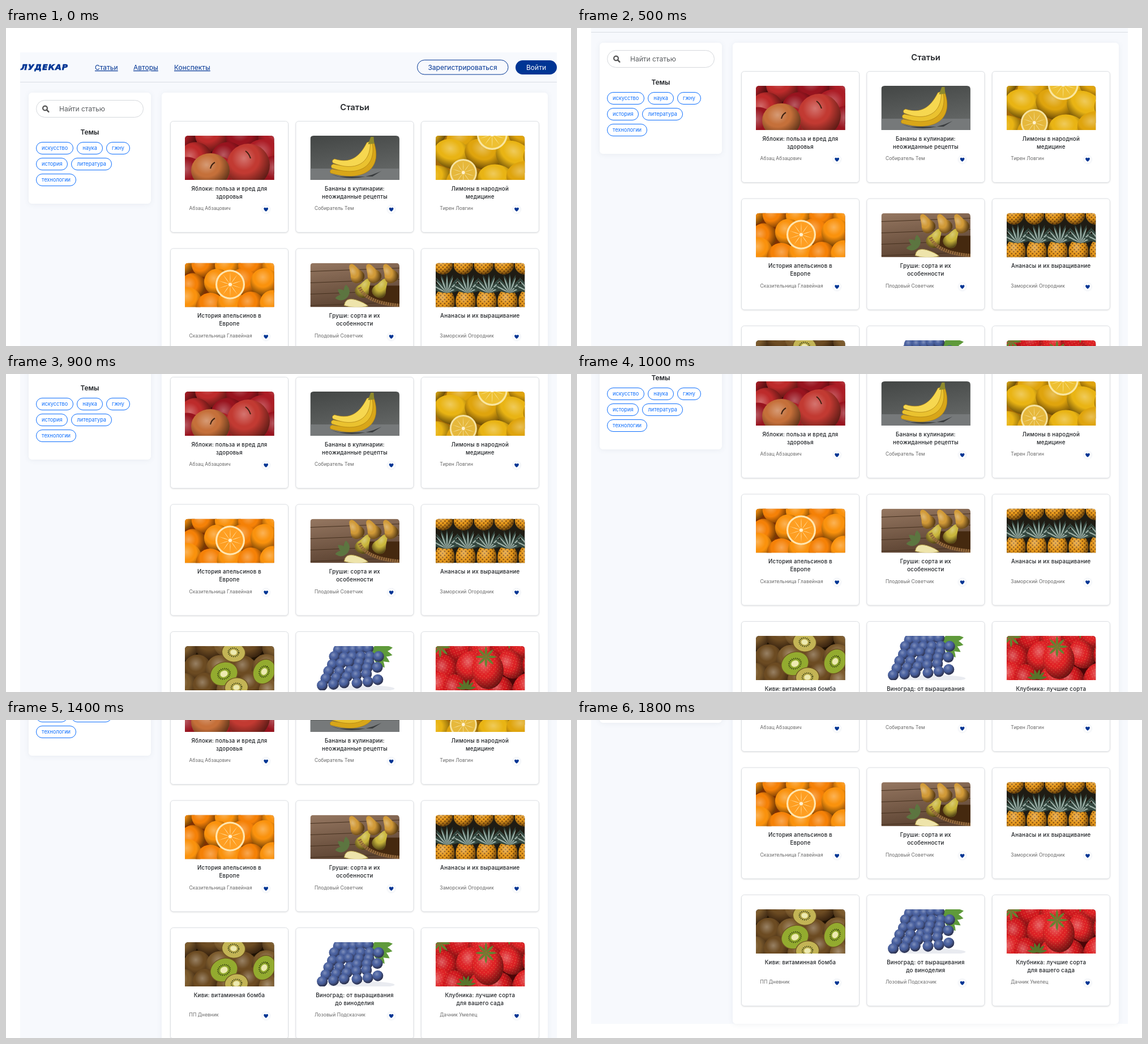
These frames come from a looping animation (998 by 561 pixels, 5000 ms). An HTML page:

```html
<!DOCTYPE html>
<html lang="ru">
<head>
<meta charset="utf-8">
<title>Статьи</title>
<style>
html, body { margin: 0; width: 100%; height: 100%; overflow: hidden; background: #fff; }
svg { display: block; width: 998px; height: 561px; font: 12px Inter, "Noto Sans", sans-serif; }
.mid { text-anchor: middle; }
.panel { fill: #fff; filter: drop-shadow(0 1px 4px rgba(30, 50, 90, .07)); }
.card { fill: #fff; stroke: #dcdfe3; filter: drop-shadow(0 1px 1px rgba(0, 0, 0, .1)); }
.nav { fill: #003594; text-decoration: underline; }
.logo { font: italic bold 14px "DejaVu Sans", sans-serif; letter-spacing: 1px; fill: #003594; stroke: #003594; stroke-width: .7; }
.head { font-weight: 600; fill: #24272b; }
.big { font-size: 14.7px; }
.title { font-size: 9.7px; font-weight: 500; letter-spacing: .26px; fill: #1d2024; }
.author { font-size: 8.5px; letter-spacing: .08px; fill: #666; }
.tags { display: flex; flex-wrap: wrap; gap: 6px; }
.tags span { padding: 0 9px; border: 1px solid #0d6efd; border-radius: 11px; font-size: 9.2px; line-height: 20px; color: #0d6efd; }
.dot { fill: #fff; filter: drop-shadow(0 0 1.5px rgba(40, 70, 130, .18)); }
</style>
</head>
<body>
<svg viewBox="0 0 998 561">
  <defs>
    <radialGradient id="shade" cx=".4" cy=".34" r=".7">
      <stop stop-color="#fff" stop-opacity=".3"/>
      <stop offset=".4" stop-color="#fff" stop-opacity="0"/>
      <stop offset=".5" stop-color="#100400" stop-opacity="0"/>
      <stop offset="1" stop-color="#100400" stop-opacity=".62"/>
    </radialGradient>
    <linearGradient id="wall" x2=".3" y2="1"><stop stop-color="#434645"/><stop offset="1" stop-color="#646766"/></linearGradient>
    <linearGradient id="wood" x2=".3" y2="1"><stop stop-color="#957761"/><stop offset="1" stop-color="#5d4433"/></linearGradient>
    <pattern id="scales" width="5" height="5" patternUnits="userSpaceOnUse" patternTransform="rotate(45)"><circle cx="2.5" cy="2.5" r="1.2" fill="#6d3d0c"/></pattern>
    <pattern id="seeds" width="5" height="5" patternUnits="userSpaceOnUse" patternTransform="rotate(45)"><circle cx="2.5" cy="2.5" r=".6" fill="#f3a564"/></pattern>
    <clipPath id="photo"><path d="M0 78V6Q0 0 6 0H151.5Q157.5 0 157.5 6V78Z"/></clipPath>
  </defs>
  <g id="page"></g>
</svg>
<script>
const times = (n, make) => Array.from({ length: n }, (_, i) => make(i)).join('');
const noise = n => { const v = Math.sin(n * 127.1 + 11.7) * 43758.5; return v - Math.floor(v); };

const rect = (x, y, w, h, attrs) => `<rect x="${x}" y="${y}" width="${w}" height="${h}" ${attrs}/>`;
const path = (d, attrs) => `<path d="${d}" ${attrs}/>`;
const text = (cls, x, y, words, attrs = '') => `<text class="${cls}" x="${x}" y="${y}" ${attrs}>${words}</text>`;
const backdrop = color => rect(0, 0, 158, 78, `fill="${color}"`);

// Flat colour, then optional dots, then light and shadow
const shaded = (shape, color, dots) => [color, dots, 'url(#shade)'].filter(Boolean)
  .map(fill => `<${shape} fill="${fill}"/>`).join('');
const ball = (color, x, y, rx, ry = rx, turn = 0, dots = '') =>
  shaded(`ellipse rx="${rx}" ry="${ry}" transform="translate(${x} ${y}) rotate(${turn})"`, color, dots);
const pear = (color, x, y, turn) =>
  shaded(`path d="M0-18C6-18 6-7 10 0C16 10 10 18 0 18C-10 18-16 10-10 0C-6-7-6-18 0-18Z" transform="translate(${x} ${y}) rotate(${turn})"`, color);

// Three staggered rows of fruit that fill the photo; flat < 1 makes ovals
function heap(colors, cols, seed, flat = 1, dots = '') {
  const w = 158 / cols;
  return times(3 * (cols + 1), i => {
    const row = Math.floor(i / (cols + 1)), col = i % (cols + 1), n = noise(seed + i);
    const x = (col + row % 2 / 2 + (n - .5) * .3) * w;
    const y = 2 + row * 36 + (noise(seed - i) - .5) * 12;
    const r = w * (.56 + n * .1);
    return ball(colors[i % colors.length], x, y, r, r * flat, n * 70 - 35, dots);
  });
}

// n pointed leaves spread over an arc around (x, y)
const leaves = (x, y, n, length, width, color, from = 0, arc = 360) => times(n, i =>
  path(`M0 0Q${width} ${-length / 2} 0 ${-length}Q${-width} ${-length / 2} 0 0`,
    `fill="${color}" transform="translate(${x} ${y}) rotate(${from + arc * i / n})"`));

const disc = (x, y, r, color) => `<circle cx="${x}" cy="${y}" r="${r}" fill="${color}"/>`;
const citrus = (x, y, r, rim, flesh) => disc(x, y, r, rim) + disc(x, y, r * .88, flesh) +
  leaves(x, y, 10, r * .84, .9, rim) + disc(x, y, r * .12, '#fff1cf');

const kiwiSlice = (x, y, r, turn, color) =>
  `<g transform="translate(${x} ${y}) rotate(${turn}) scale(1 .82)">` +
  disc(0, 0, r + 1.5, '#6f5423') + disc(0, 0, r, color) +
  `<circle r="${r * .45}" fill="none" stroke="#29310c" stroke-width="3" stroke-dasharray="1.2 2"/>` +
  disc(0, 0, r * .28, '#edeab0') + '</g>';

const banana = (color, i) => path(
  `M${112 - 3 * i} 10C${130 - 11 * i} ${62 - 6 * i} ${90 - 6 * i} ${82 - 9 * i} ${36 + 2 * i} ${66 - 9 * i}` +
  `q-3-5 3-7C${80 - 4 * i} ${68 - 9 * i} ${100 - 6 * i} ${46 - 5 * i} ${106 - 3 * i} 12Z`,
  `fill="${color}" stroke="#a87c12" stroke-width=".7"`);

const photos = {
  apples: () => backdrop('#3d070b') + heap(['#ac1d26', '#bd2b2b', '#98141f'], 3, 4) +
    ball('#c23a32', 112, 52, 38) + ball('#c5703a', 45, 61, 34, 30) +
    path('M45 58q2-8 8-11M116 40q-3-9-9-13', 'stroke="#3c2010" stroke-width="2" fill="none"'),

  bananas: () => backdrop('url(#wall)') + rect(0, 58, 158, 20, 'fill="#76797a"') +
    path('M36 68Q80 84 126 62L110 72H52Z', 'fill="#3a3d3f"') +
    ['#d8a619', '#eac22f', '#f6d750'].map(banana).join('') +
    path('M102 15L107 2H112L113 14Z', 'fill="#8f8a2c"'),

  lemons: () => backdrop('#a46a05') + heap(['#e9b414', '#dfa40d'], 3, 8, .78) +
    citrus(100, -2, 27, '#f9e6a0', '#eec032') + citrus(49, 65, 24, '#f6e3a2', '#e6b83c'),

  oranges: () => backdrop('#7c3203') + heap(['#fa920d', '#f58107'], 4, 3) +
    citrus(80, 38, 26, '#ffe6b0', '#ff9f22'),

  pears: () => backdrop('url(#wood)') +
    times(4, i => path(`M0 ${15 + i * 20}L158 ${9 + i * 20}`, 'stroke="#46311f" stroke-width="1.2"')) +
    path('M88 40Q95 72 158 76V40Z', 'fill="#45290f"') +
    times(5, i => pear(i % 2 ? '#c9b63c' : '#d19a38', 80 + i * 15, i % 2 ? 44 : 18, i % 2 ? 30 : -30)) +
    path('M87 43Q98 70 158 75', 'stroke="#93693c" stroke-width="6" stroke-dasharray="3 1" fill="none"') +
    leaves(66, 60, 3, 22, 10, '#5c7540', -95, 130) +
    path('M60 75Q62 60 80 65Q96 70 102 76Q80 81 60 75Z', 'fill="#eee4ab" stroke="#b9a448"'),

  pineapples: () => backdrop('#1f1c14') +
    times(5, i => ball('#e89a1c', 13 + 36 * i, 4, 17, 16, 0, 'url(#scales)')) +
    times(5, i => ball('#e89a1c', 16 + 37 * i, 68, 17.5, 23, 0, 'url(#scales)')) +
    times(5, i => leaves(20 + 37 * i, 53, 9, 34, 5, '#33473f', -72, 162) +
      leaves(20 + 37 * i, 53, 7, 30, 2.5, '#9db0a8', -62, 146)),

  kiwis: () => backdrop('#1f1204') + heap(['#7b5a2d', '#6c4b22'], 4, 6) +
    kiwiSlice(86, 11, 20, 8, '#c3b455') + kiwiSlice(69, 49, 24, -22, '#93ab2f') +
    kiwiSlice(140, 45, 22, -60, '#93ab2f') + kiwiSlice(91, 73, 20, -8, '#c3b455'),

  grapes: () => backdrop('#fff') + '<ellipse cx="90" cy="75" rx="59" ry="6" fill="#e9ebf0"/>' +
    leaves(108, 8, 5, 38, 13, '#5f9a3b', 62, 100) +
    times(6, row => times(5 + row % 2, i => {
      const n = noise(row * 9 + i);
      return ball('#4a619f', 46 - row * 5 + i * (14 + row) + n * 5, 4 + row * 13 - i * row * .5 + n * 4, 9.5);
    })),

  berries: () => backdrop('#4a0507') + heap(['#dd2226', '#d0191f'], 4, 12, 1.15, 'url(#seeds)') +
    ball('#df2326', 92, 42, 28, 34, -5, 'url(#seeds)') +
    [8, 89, 130].map((x, i) => leaves(x, i * 34 % 50 - i * 17 + 2, 8, 19, 4.5, '#648331')).join('') +
    leaves(54, 76, 6, 18, 5, '#58752b', -80, 190)
};

const articles = [
  ['apples', 'Яблоки: польза и вред для|здоровья', 'Абзац Абзацович'],
  ['bananas', 'Бананы в кулинарии:|неожиданные рецепты', 'Собиратель Тем'],
  ['lemons', 'Лимоны в народной|медицине', 'Тирен Ловгин'],
  ['oranges', 'История апельсинов в|Европе', 'Сказительница Главейная'],
  ['pears', 'Груши: сорта и их|особенности', 'Плодовый Советчик'],
  ['pineapples', 'Ананасы и их выращивание', 'Заморский Огородник'],
  ['kiwis', 'Киви: витаминная бомба', 'ПП Дневник'],
  ['grapes', 'Виноград: от выращивания|до виноделия', 'Лозовый Подсказчик'],
  ['berries', 'Клубника: лучшие сорта|для вашего сада', 'Дачник Умелец']
];
const tags = ['искусство', 'наука', 'гжну', 'история', 'литература', 'технологии'];
const heart = 'M0 3.8C-5 .5-4.6-3.2-2-3.2Q-.6-3.2 0-2Q.6-3.2 2-3.2C4.6-3.2 5 .5 0 3.8Z';

function card([photo, title, author], i) {
  const x = 290.5 + i % 3 * 221.4, y = 164.5 + Math.floor(i / 3) * 224.5;
  return `<g transform="translate(${x} ${y})">` +
    rect(0, 0, 208, 196, 'rx="5" class="card"') +
    `<g transform="translate(25.5 25.5)" clip-path="url(#photo)">${photos[photo]()}</g>` +
    title.split('|').map((line, n) => text('title mid', 104, 122.3 + n * 14, line)).join('') +
    text('author', 33, 156.5, author) +
    '<circle class="dot" cx="168.7" cy="155.5" r="6.5"/>' +
    path(heart, 'fill="#003594" transform="translate(168.7 155.5)"') + '</g>';
}

const header =
  rect(25, 95, 948, 1, 'fill="#d9dde4"') +
  text('logo', 26, 74, 'ЛУДЕКАР') +
  text('nav', 157, 74, 'Статьи') + text('nav', 225, 74, 'Авторы') + text('nav', 297, 74, 'Конспекты') +
  rect(726.5, 56.5, 160.5, 25.5, 'rx="12.7" fill="#f7f9fd" stroke="#003594"') +
  text('mid', 806.5, 74, 'Зарегистрироваться', 'fill="#003594"') +
  rect(900, 57, 73, 25, 'rx="12.5" fill="#003594"') +
  text('mid', 936.5, 74, 'Войти', 'fill="#fff"');

const sidebar =
  rect(40, 114, 216, 196, 'rx="6" class="panel"') +
  rect(53.5, 127.5, 189, 30, 'rx="15" fill="#fff" stroke="#d5d8dc"') +
  '<circle cx="69" cy="141.5" r="3.9" fill="none" stroke="#555" stroke-width="2.2"/>' +
  path('M72 144.5L75.3 147.8', 'stroke="#555" stroke-width="2.5" stroke-linecap="round"') +
  text('', 94, 147, 'Найти статью', 'fill="#595c5f"') +
  text('head mid', 148, 188.3, 'Темы') +
  '<foreignObject x="53" y="201" width="190" height="90"><div xmlns="http://www.w3.org/1999/xhtml" class="tags">' +
  tags.map(tag => `<span>${tag}</span>`).join('') + '</div></foreignObject>';

const page = document.getElementById('page');
page.innerHTML = rect(25, 43, 948, 798, 'fill="#f7f9fd"') + header + sidebar +
  rect(275, 114, 682, 727, 'rx="6" class="panel"') +
  text('head big mid', 616, 145, 'Статьи') + articles.map(card).join('');

// Steady scroll in 100 ms steps until the page end, then rest
function draw() {
  const step = Math.floor(performance.now() % 5000 / 100);
  const scroll = Math.round(Math.min(305, step * 17.65));
  page.setAttribute('transform', `translate(0 ${-scroll})`);
  requestAnimationFrame(draw);
}
draw();
</script>
</body>
</html>
```
